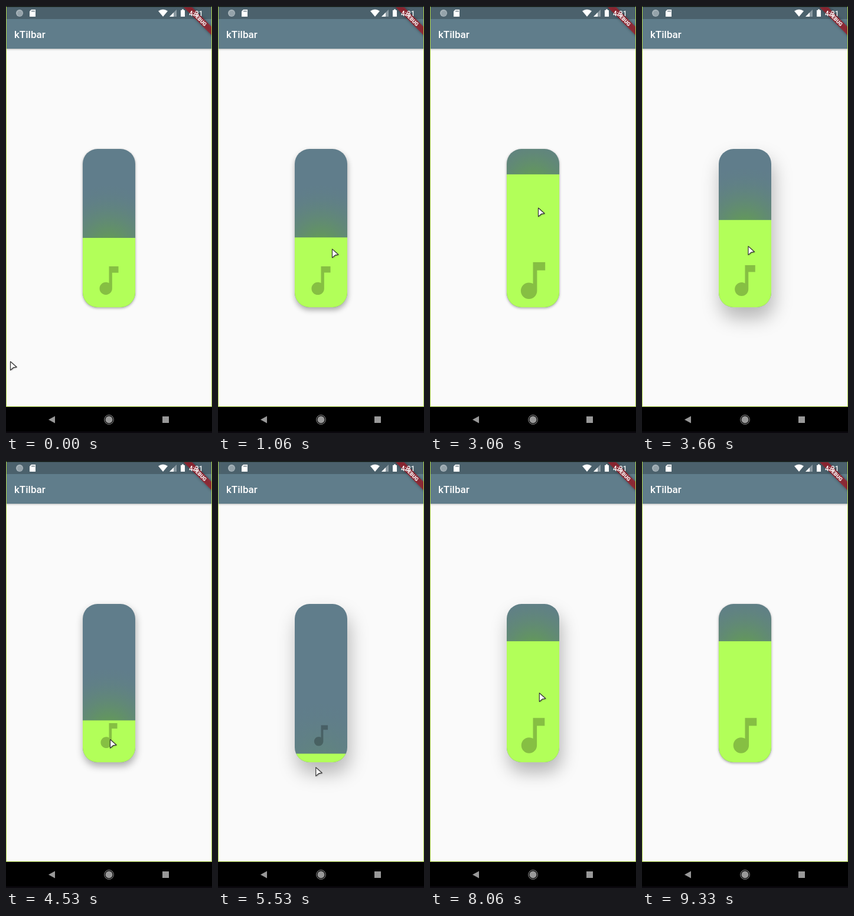
An HTML page with a canvas for the animation above (9.66 s loop, 349x720 px).

```html
<!DOCTYPE html>
<html lang="en">
<head>
<meta charset="utf-8">
<title>Vertical slider</title>
<style>
html, body { margin: 0; height: 100%; overflow: hidden; background: #000; }
canvas { display: block; }
</style>
</head>
<body>
<canvas id="stage" width="349" height="720"></canvas>
<script>
const ctx = document.getElementById('stage').getContext('2d');
const LOOP = 9660;
const BOX = { x: 130, y: 241, w: 89, h: 267, r: 25 };
const BOTTOM = BOX.y + BOX.h;
const MIDDLE = BOX.x + BOX.w / 2;
const START_TOP = 391;
const DRAG_RATIO = 1.19;
const LIFT_TIME = 220;
const NOTE = new Path2D('M12 3v10.55c-.59-.34-1.27-.55-2-.55-2.21 0-4 1.79-4 4s1.79 4 4 4 4-1.79 4-4V7h4V3z');
const ARROW = new Path2D('M0 0L10.5 9.3L5 10.2L0 14.5Z');

const ENTRY = { release: 60, to: [7, 599] };
const EXIT = { press: 8800, from: [160, 724] };
const DRAGS = [
  { press: 1000, stop: 2260, release: 2520, from: [193, 410], to: [191, 320] },
  { press: 3060, stop: 4260, release: 4390, from: [183, 340], to: [176, 469] },
  { press: 4800, stop: 6330, release: 6480, from: [176, 469], to: [153, 570] },
  { press: 7000, stop: 7800, release: 8020, from: [157, 559.5], to: [185, 388] },
];

const clamp = (v, lo, hi) => Math.min(hi, Math.max(lo, v));

function ease(t, start, end) {
  const p = clamp((t - start) / (end - start), 0, 1);
  return p * p * (3 - 2 * p);
}

const mix = (a, b, p) => a.map((v, i) => v + (b[i] - v) * p);

const dragPoint = (d, t) => mix(d.from, d.to, ease(t, d.press, d.stop));

function pointerAt(t) {
  const last = DRAGS.findLast(d => d.press <= t) || ENTRY;
  if (t < last.release) return last.press ? dragPoint(last, t) : last.to;
  const next = DRAGS.find(d => d.press > t) || EXIT;
  return mix(last.to, next.from, ease(t, last.release, next.press));
}

// The fill follows the pointer of every drag so far, held inside the box.
const fillTopAt = t => DRAGS.reduce((top, d) =>
  clamp(top + DRAG_RATIO * (dragPoint(d, t)[1] - d.from[1]), BOX.y, BOTTOM), START_TOP);

const liftAt = t => DRAGS.reduce((sum, d) =>
  sum + ease(t, d.press, d.press + LIFT_TIME) - ease(t, d.release, d.release + LIFT_TIME), 0);

function rect(color, x, y, w, h) {
  ctx.fillStyle = color;
  ctx.fillRect(x, y, w, h);
}

function polygon(color, ...points) {
  ctx.fillStyle = color;
  ctx.beginPath();
  for (const [x, y] of points) ctx.lineTo(x, y);
  ctx.closePath();
  ctx.fill();
}

function disc(color, x, y, r) {
  ctx.fillStyle = color;
  ctx.beginPath();
  ctx.arc(x, y, r, 0, 7);
  ctx.fill();
}

function text(str, x, y, font, align = 'left') {
  ctx.font = font + ' Roboto, sans-serif';
  ctx.textAlign = align;
  ctx.fillStyle = '#fff';
  ctx.fillText(str, x, y);
}

function shadow(alpha, blur, x = 0, y = 0) {
  ctx.shadowColor = `rgba(0,0,0,${alpha})`;
  ctx.shadowBlur = blur;
  ctx.shadowOffsetX = x;
  ctx.shadowOffsetY = y;
}

function drawStatusIcons() {
  disc('#a9b5bb', 23, 12, 6);
  disc('#95a3aa', 23.5, 12.5, 4.5);
  polygon('#fff', [43, 6], [50, 6], [50, 18], [40, 18], [40, 9]);
  for (const x of [43.5, 45.5, 47.5]) rect('#4b616c', x, 7.5, 1, 2.5);

  ctx.fillStyle = '#fff';
  ctx.beginPath();
  ctx.moveTo(266, 18);
  ctx.lineTo(258, 8.5);
  ctx.quadraticCurveTo(266, 3, 274, 8.5);
  ctx.fill();
  polygon('#8a99a1', [289, 6], [289, 18], [277, 18]);
  polygon('#fff', [284, 11], [284, 18], [277, 18]);
  rect('#fff', 298, 5.5, 3, 2);
  rect('#fff', 296, 7, 7, 11);
}

function drawRibbon() {
  ctx.save();
  ctx.beginPath();
  ctx.rect(0, 2, 349, 673);
  ctx.clip();
  ctx.translate(349, 2);
  ctx.rotate(Math.PI / 4);
  shadow(.5, 5);
  rect('rgba(165,28,40,.74)', -40, 23.8, 80, 10.2);
  shadow(0, 0);
  text('DEBUG', 0, 32, '900 8.7px', 'center');
  ctx.restore();
}

function drawScreen() {
  rect('#fafafa', 0, 0, 349, 720);
  ctx.save();
  shadow(.28, 3, 0, 1);
  rect('#607d8b', 0, 2, 349, 70);
  ctx.restore();
  rect('#4b616c', 0, 1, 349, 21);
  rect('#10150f', 0, 0, 349, 1.5);
  text('kTilbar', 14, 54, '500 17px');
  drawStatusIcons();
  drawRibbon();
  text('4:31', 310, 16.5, '500 12px');

  rect('#a9cf45', 0, 1, 1, 675);
  rect('#a9cf45', 348, 1, 1, 675);
  rect('#a9cf45', 0, 675, 349, 1);
  rect('#000', 0, 676, 349, 44);
  rect('#17121f', 0, 718, 349, 1);
  polygon('#999', [72, 697.5], [83, 691.5], [83, 703.5]);
  disc('#999', 174.5, 697.5, 6);
  ctx.strokeStyle = '#999';
  ctx.lineWidth = 1;
  ctx.beginPath();
  ctx.arc(174.5, 697.5, 7.8, 0, 7);
  ctx.stroke();
  rect('#999', 265, 692, 11, 11);
}

function drawSlider(top, lift) {
  const value = (BOTTOM - top) / BOX.h;
  const body = new Path2D();
  body.roundRect(BOX.x, BOX.y, BOX.w, BOX.h, BOX.r);

  ctx.save();
  ctx.fillStyle = '#607d8b';
  shadow(.34 - .06 * lift, 4 + 28 * lift, 3.5 * lift, 1.5 + 16.5 * lift);
  ctx.fill(body);
  shadow(0, 0);
  ctx.clip(body);

  const glow = ctx.createRadialGradient(MIDDLE, top + 18, 0, MIDDLE, top + 18, 108);
  const strength = Math.min(1, value * 5);
  for (let p = 0; p <= 1; p += .125) {
    glow.addColorStop(p, `rgba(100,165,68,${.92 * strength * (1 - p) ** 1.8})`);
  }
  rect(glow, BOX.x, BOX.y, BOX.w, BOX.h);
  rect('#b2ff59', BOX.x, top, BOX.w, BOTTOM - top);

  const scale = (44 + 46 * value) / 24;
  ctx.translate(MIDDLE, 463);
  ctx.scale(scale, scale);
  ctx.translate(-12, -12);
  ctx.fillStyle = 'rgba(0,0,0,.25)';
  ctx.fill(NOTE);
  ctx.restore();
}

function drawPointer(x, y) {
  ctx.save();
  ctx.translate(x + .5, y + .5);
  ctx.lineJoin = 'round';
  ctx.lineWidth = 1.2;
  ctx.strokeStyle = '#333';
  ctx.fillStyle = '#fff';
  shadow(.45, 2, 1, 1);
  ctx.fill(ARROW);
  shadow(0, 0);
  ctx.stroke(ARROW);
  ctx.restore();
}

function frame() {
  const t = performance.now() % LOOP;
  drawScreen();
  drawSlider(fillTopAt(t), liftAt(t));
  drawPointer(...pointerAt(t));
  requestAnimationFrame(frame);
}
frame();
</script>
</body>
</html>
```
